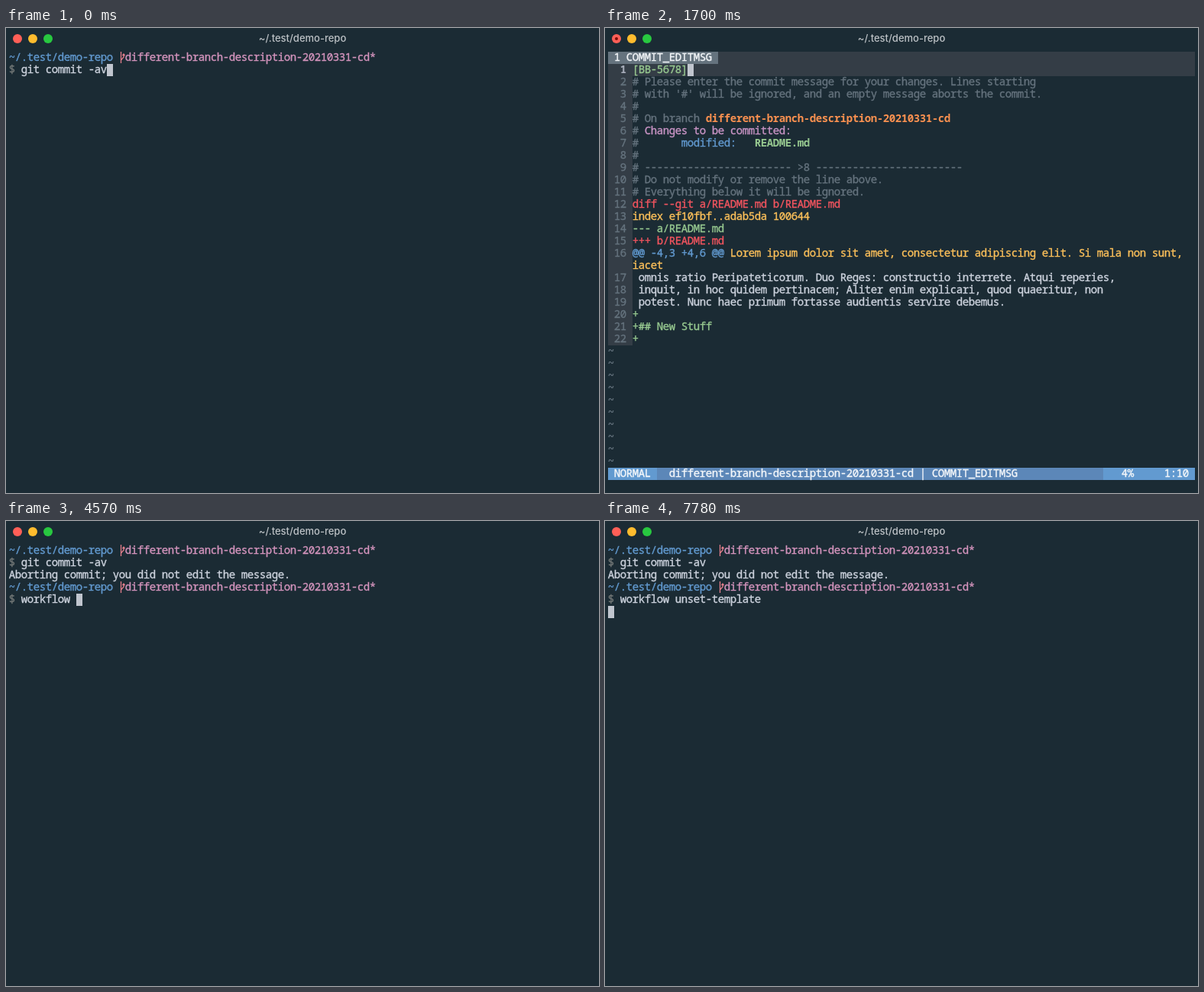
Recreate the animation shown at these times as an HTML page with a canvas. Size 776 by 608 pixels, loop 8 s.

```html
<!DOCTYPE html>
<html lang="en">
<head>
<meta charset="utf-8">
<title>Terminal</title>
<style>
  html, body { margin: 0; width: 100%; height: 100%; overflow: hidden; background: #1b2b34; }
  canvas { display: block; }
</style>
</head>
<body>
<canvas id="stage" width="776" height="608"></canvas>
<script>
const ctx = document.getElementById('stage').getContext('2d');
const LOOP = 8000, CW = 8, CH = 16, X0 = 4, Y0 = 31;
const MONO = '14px "Noto Sans Mono", "DejaVu Sans Mono", monospace';
const C = {
  bg: '#1b2b34', line: '#343d46', dim: '#65737e', text: '#cdd3de', cursor: '#c0c5ce',
  red: '#f2555f', orange: '#fb9150', yellow: '#fcc05a', green: '#97c990',
  blue: '#629ad0', purple: '#c994c5', pink: '#d494bd', bar: '#5c87b8', white: '#f4f7fa'
};
const BRANCH = 'different-branch-description-20210331-cd';
const COMMAND = 'workflow unset-template';

// [time, characters of COMMAND typed so far]
const KEYS = [
  [4210, 1], [4300, 3], [4390, 5], [4480, 7], [4570, 9], [5550, 10],
  [5730, 11], [5820, 13], [5910, 14], [6090, 15], [6270, 16], [6360, 17],
  [6540, 18], [6990, 19], [7160, 20], [7250, 22], [7330, 23]
];

// Message buffer: one entry per line, made of [text, colour, bold] runs
const BUFFER = [
  [['[BB-5678]', C.green]],
  [['# Please enter the commit message for your changes. Lines starting', C.dim]],
  [["# with '#' will be ignored, and an empty message aborts the commit.", C.dim]],
  [['#', C.dim]],
  [['# On branch ', C.dim], [BRANCH, C.orange, true]],
  [['# ', C.dim], ['Changes to be committed:', C.purple]],
  [['#       ', C.dim], ['modified:   ', C.blue], ['README.md', C.green, true]],
  [['#', C.dim]],
  [['# ' + '-'.repeat(24) + ' >8 ' + '-'.repeat(24), C.dim]],
  [['# Do not modify or remove the line above.', C.dim]],
  [['# Everything below it will be ignored.', C.dim]],
  [['diff --git a/README.md b/README.md', C.red]],
  [['index ef10fbf..adab5da 100644', C.yellow]],
  [['--- a/README.md', C.green]],
  [['+++ b/README.md', C.red]],
  [['@@ -4,3 +4,6 @@ ', C.blue],
   ['Lorem ipsum dolor sit amet, consectetur adipiscing elit. Si mala non sunt,', C.yellow]],
  [[' omnis ratio Peripateticorum. Duo Reges: constructio interrete. Atqui reperies,', C.text]],
  [[' inquit, in hoc quidem pertinacem; Aliter enim explicari, quod quaeritur, non', C.text]],
  [[' potest. Nunc haec primum fortasse audientis servire debemus.', C.text]],
  [['+', C.green]],
  [['+', C.green], ['## ', C.green, true], ['New Stuff', C.green]],
  [['+', C.green]]
];

function fill(row, col, cols, color, rows = 1) {
  ctx.fillStyle = color;
  ctx.fillRect(X0 + col * CW, Y0 + row * CH, cols * CW, rows * CH);
}

// One glyph centred in each cell, with a hairline outline for weight
function write(row, col, text, color, bold) {
  ctx.font = (bold ? 'bold ' : '') + MONO;
  ctx.textAlign = 'center';
  ctx.fillStyle = ctx.strokeStyle = color;
  ctx.lineWidth = 0.35;
  const y = Y0 + row * CH + 12;
  [...text].forEach((glyph, i) => {
    const x = X0 + (col + i + 0.5) * CW;
    ctx.fillText(glyph, x, y);
    if (!bold) ctx.strokeText(glyph, x, y);
  });
}

const cursor = (row, col) => fill(row, col, 1, C.cursor);

function titleBar(unsaved) {
  ['#ff5f57', '#febc2e', '#28c840'].forEach((color, i) => dot(15 + i * 20, 6, color));
  if (unsaved) dot(15, 2, '#7e0b08');
  ctx.font = '500 13px Inter, "Open Sans", sans-serif';
  ctx.fillStyle = '#bdc2c6';
  ctx.textAlign = 'center';
  ctx.fillText('~/.test/demo-repo', 388, 18);
}

function dot(x, r, color) {
  ctx.fillStyle = color;
  ctx.beginPath();
  ctx.arc(x, 14, r, 0, Math.PI * 2);
  ctx.fill();
}

function prompt(row, command) {
  const y = Y0 + row * CH;
  write(row, 0, '~/.test/demo-repo', C.blue);
  write(row, 19, BRANCH + '*', C.pink);
  ctx.strokeStyle = '#e57f8c';
  ctx.lineWidth = 1.3;
  ctx.beginPath();
  ctx.moveTo(150.5, y);
  ctx.lineTo(150.5, y + 15);
  ctx.moveTo(150.5, y + 11);
  ctx.lineTo(154, y + 7);
  ctx.lineTo(154, y + 3);
  ctx.moveTo(152.5, y + 5);
  ctx.lineTo(154, y + 3);
  ctx.lineTo(155.5, y + 5);
  ctx.stroke();
  write(row + 1, 0, '$', '#737877');
  write(row + 1, 2, command, C.text);
}

function editor(t) {
  fill(0, 0, 96, C.line, 2);
  fill(0, 0, 18, C.dim);
  write(0, 1, '1 COMMIT_EDITMSG', C.white);
  fill(2, 0, 4, C.line, 22);

  BUFFER.forEach((runs, i) => {
    const row = i + (i < 16 ? 1 : 2);
    write(row, 0, String(i + 1).padStart(3), i ? C.dim : '#a7adba', !i);
    let col = 4;
    for (const [text, color, bold] of runs) {
      write(row, col, text, color, bold);
      col += text.length;
    }
  });
  write(17, 4, 'iacet', C.yellow);
  for (let row = 24; row < 34; row++) write(row, 0, '~', C.dim);

  fill(34, 0, 96, C.blue);
  fill(34, 8, 73, C.bar);
  write(34, 1, 'NORMAL', C.white);
  write(34, 10, BRANCH + ' | COMMIT_EDITMSG', C.white);
  write(34, 84, '4%', C.white);
  write(34, 91, '1:10', C.white);

  if (t >= 3670) {
    cursor(35, 0);
    write(35, 0, ':', C.bg);
    write(35, 1, 'q', C.text);
  } else if (t >= 1700) {
    cursor(1, 13);
  }
  if (t >= 3140 && t < 3230) write(35, 85, '^[', C.text);
}

function shell(t) {
  prompt(0, 'git commit -av');
  if (t < 1440) return cursor(1, 16);
  if (t < 1530) return cursor(2, 0);
  const typed = KEYS.reduce((n, [at, count]) => t >= at ? count : n, 0);
  write(2, 0, 'Aborting commit; you did not edit the message.', C.text);
  prompt(3, COMMAND.slice(0, typed));
  if (t < 7780) cursor(4, 2 + typed);
  else cursor(5, 0);
}

function draw(t) {
  ctx.fillStyle = C.bg;
  ctx.fillRect(0, 0, 776, 608);
  titleBar(t >= 1610 && t < 4210);
  if (t < 1530 || t >= 3760) shell(t);
  else if (t < 1610) cursor(0, 0);
  else editor(t);
}

const start = performance.now();
function tick() {
  draw((performance.now() - start) % LOOP);
  requestAnimationFrame(tick);
}
tick();
</script>
</body>
</html>
```
